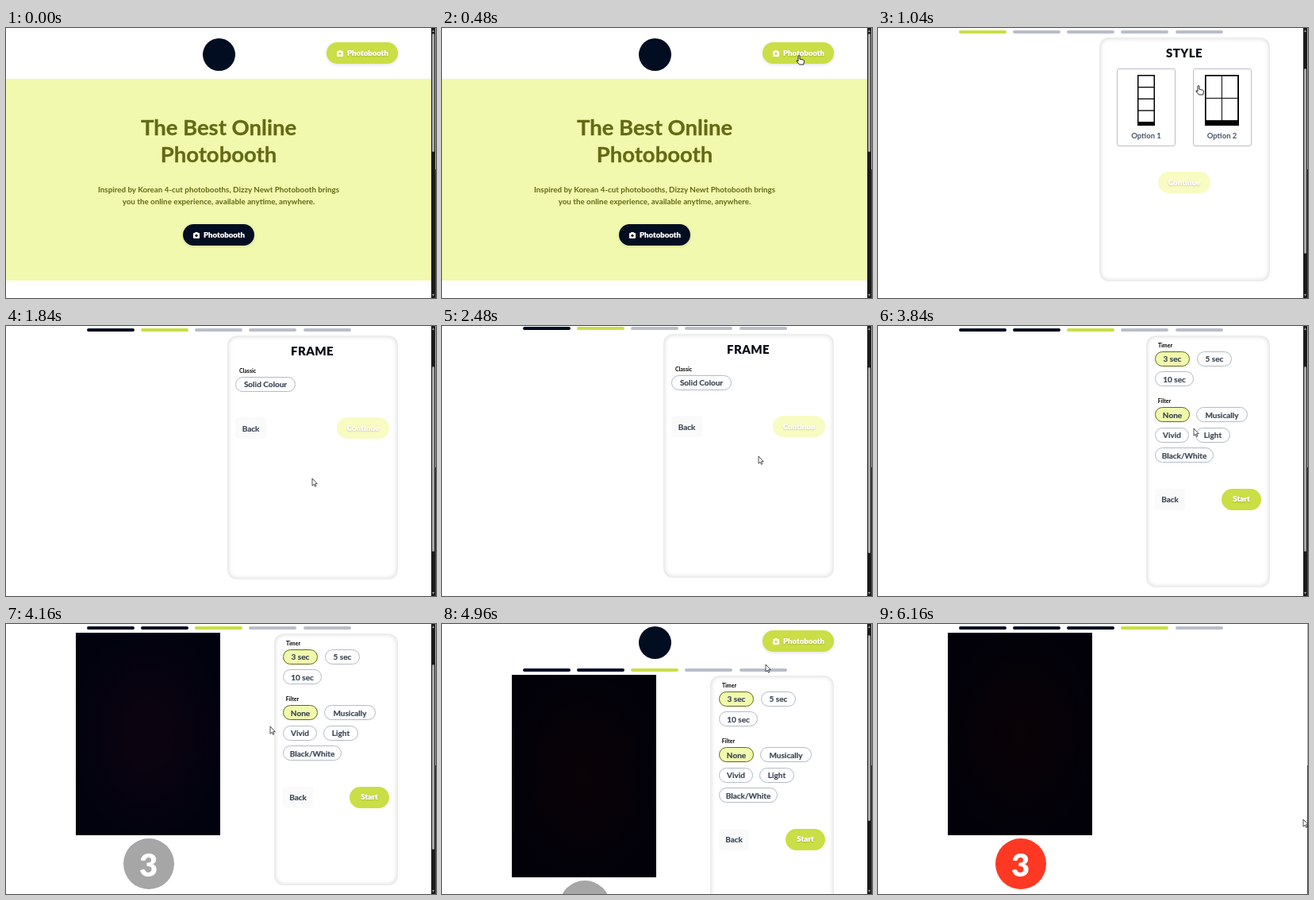
An HTML page that plays this animation: 542 px wide and 340 px high, repeating every 6.24 s.

```html
<!DOCTYPE html>
<html lang="en">
<head>
<meta charset="utf-8">
<title>Online photobooth</title>
<style>
html, body { margin: 0; width: 100%; height: 100%; overflow: hidden; background: #fff; }
#stage { position: relative; width: 542px; height: 340px; overflow: hidden; background: #fff; font-family: Lato, "Open Sans", sans-serif; font-weight: 700; }
#stage div { position: absolute; box-sizing: border-box; }
#stage svg { position: absolute; overflow: visible; }
#stage .text { white-space: nowrap; transform: translate(-50%, -50%); line-height: 1; }
#stage .button { display: flex; align-items: center; justify-content: center; white-space: nowrap; font-size: 10px; line-height: 1; color: #3c4656; -webkit-text-stroke: .2px; }
#stage .pill { border: 1px solid #b4bac6; border-radius: 10px; }
#stage .chosen { background: #f1f9ad; border-color: #626b14; }
#stage .cta { border-radius: 14px; background: #cade45; color: #fff; font-weight: 900; font-size: 9.8px; text-shadow: 0 1px 2px #0003; }
#stage .hover { background: #dfee87; }
#stage .off { background: #f8fbc2; }
#stage .back { border-radius: 4px; background: #fafafa; }
#stage .panel { border-radius: 12px; background: #fff; box-shadow: inset 0 0 5px 2px #e3e3e3; }
</style>
</head>
<body>
<div id="stage"></div>
<script>
const LOOP = 6240, STEP = 80;
const NAVY = '#020d22', LIME = '#cade45', GREY = '#b9bec9', OLIVE = '#626b14';
const stage = document.getElementById('stage');

const scrollKeys = [[0, 0], [640, 0], [960, 63], [1920, 63], [2160, 65], [2480, 65], [2560, 63],
  [4240, 63], [4800, 10], [5840, 10], [5920, 63]];
const cursorKeys = [[0, 548, 150], [400, 450, 34], [640, 450, 34], [1040, 404, 72], [1280, 432, 88],
  [1440, 432, 88], [1680, 386, 192], [1840, 386, 192], [2480, 399, 164], [2800, 330, 72],
  [2960, 330, 72], [3360, 463, 129], [3520, 463, 129], [4160, 333, 129], [4480, 333, 129],
  [4960, 408, 51], [5280, 300, 110], [5680, 458, 268], [5840, 458, 268], [6160, 536, 246]];
const handTimes = [[320, 640], [1040, 1520], [1600, 1760], [2720, 3040], [3280, 3440], [5600, 5920]];

const within = (t, [from, to]) => t >= from && t < to;

// Eased values between timed keys
function at(keys, t) {
  const i = keys.findIndex(k => k[0] > t);
  if (i < 0) return keys[keys.length - 1].slice(1);
  const a = keys[i - 1], b = keys[i];
  const p = (t - a[0]) / (b[0] - a[0]), e = p * p * (3 - 2 * p);
  return a.slice(1).map((v, n) => v + (b[n + 1] - v) * e);
}

const box = (x, y, w, h, css = '', html = '', cls = '') =>
  `<div class="${cls}" style="left:${x}px;top:${y}px;width:${w}px;height:${h}px;${css}">${html}</div>`;
const fill = (x, y, w, h, color, radius = 0) => box(x, y, w, h, `background:${color};border-radius:${radius}px`);
const text = (x, y, size, str, css = '') =>
  `<div class="text" style="left:${x}px;top:${y}px;font-size:${size}px;${css}">${str}</div>`;
const button = (x, y, w, h, label, cls, css = '') => box(x, y, w, h, css, label, 'button ' + cls);
const pill = (x, y, w, label, chosen) => button(x, y, w, 19, label, chosen ? 'pill chosen' : 'pill');
const svg = (x, y, body) => `<svg width="1" height="1" style="left:${x}px;top:${y}px">${body}</svg>`;

const boothButton = (x, y, color) =>
  button(x, y, 90, 27, 'Photobooth', 'cta', `padding-left:14px;font-size:9.6px;background:${color};box-shadow:0 1px 4px #0002`) +
  svg(x + 13, y + 10, `<path d="M0 2q0-1 1-1h1l.7-1h2.6l.7 1h1q1 0 1 1v5q0 1-1 1H1q-1 0-1-1z" fill="#fff"/>
    <circle cx="4" cy="4.3" r="1.6" fill="${color}"/>`);

const header = () => fill(247.5, -50, 41, 41, NAVY, 21) + boothButton(404, -45, LIME);

const progress = step => [0, 1, 2, 3, 4].map(i =>
  fill(101.5 + 68.3 * i, 2.75, 60, 4.5, i < step ? NAVY : i > step ? GREY : LIME, 2.5)).join('');

const landing = () => {
  const heading = `color:${OLIVE};-webkit-text-stroke:.3px`;
  const body = `color:${OLIVE}`;
  return fill(0, 1, 536, 254, '#f1f9af') +
    text(268, 61.5, 27.5, 'The Best Online', heading) +
    text(268, 95.5, 27.5, 'Photobooth', heading) +
    text(268, 140.5, 9.8, 'Inspired by Korean 4-cut photobooths, Dizzy Newt Photobooth brings', body) +
    text(268, 155.5, 9.8, 'you the online experience, available anytime, anywhere.', body) +
    boothButton(223, 184, NAVY);
};

const title = str => text(386, 30.5, 15, str, 'font-weight:900;letter-spacing:.4px;color:#050a14');
const caption = (x, y, str) => text(x, y, 7, str, 'color:#000');

function option(x, label, icon, chosen) {
  return box(x, 51, 74, 98, `border:1px solid ${chosen ? OLIVE : GREY};border-radius:3px;background:${chosen ? '#f1f9ad' : '#fff'}`) +
    icon + text(x + 37, 136, 9.5, label, 'color:#4a5568');
}

function style(t) {
  const chosen = t >= 1360;
  const strip = svg(327, 59, `<path d="M0 0H22V64H0z"/>` + [0, 1, 2, 3].map(i =>
    `<path d="M1.5 ${1.5 + 14.7 * i}h19v13.4h-19z" fill="#fff"/>`).join(''));
  const grid = svg(412, 59, `<path d="M0 0H43V64H0z"/>` + [0, 1, 2, 3].map(i =>
    `<path d="M${1.7 + 20.2 * (i % 2)} ${1.7 + 28.2 * (i >> 1)}h19.2v27.2h-19.2z" fill="#fff"/>`).join(''));
  const state = !chosen ? 'off' : t >= 1600 ? 'hover' : '';
  return box(279, 12, 215, 307, '', '', 'panel') + title('STYLE') +
    option(301, 'Option 1', strip, false) + option(396.5, 'Option 2', grid, chosen) +
    button(353, 181, 66, 27, 'Continue', 'cta ' + state);
}

function preview() {
  let html = box(43, 12, 214, 316.5, 'border:3px solid #b9bec1;background:#fff');
  for (const x of [53, 152]) for (const y of [22.5, 159]) html += fill(x, y, 95, 132.5, '#000');
  return html;
}

function frame(t) {
  const chosen = t >= 2960;
  const state = !chosen ? 'off' : t >= 3280 ? 'hover' : '';
  return (chosen ? preview() : '') +
    box(279, 12, 215, chosen ? 317 : 307, '', '', 'panel') + title('FRAME') +
    caption(304.5, 56, 'Classic') + pill(289, 63.5, 76, 'Solid Colour', chosen) +
    button(289, 115, 39, 27, 'Back', 'back') + button(417, 115, 66, 27, 'Continue', 'cta ' + state);
}

function camera(t, color) {
  const glow = t < 4480 ? '#0d0310, #02020f 75%' : '#090206, #020109 75%';
  return box(88, 11, 182, 255, `background:radial-gradient(${glow})`) +
    fill(147.7, 270, 64, 64, color, 32) +
    text(179.7, 302.5, 40, '3', 'font-weight:900;color:#fff');
}

const settings = t =>
  (t >= 3920 ? camera(t, '#a6a6a6') : '') +
  box(338, 12, 156, 317, '', '', 'panel') +
  caption(362, 23.5, 'Timer') +
  pill(349, 31.5, 44, '3 sec', true) + pill(402, 31.5, 44, '5 sec') + pill(349, 57, 49, '10 sec') +
  caption(361, 93.5, 'Filter') +
  pill(349, 102, 44, 'None', true) + pill(401, 102, 65, 'Musically') +
  pill(349, 127.5, 43, 'Vivid') + pill(400, 127.5, 44, 'Light') + pill(349, 153, 74, 'Black/White') +
  button(349, 204.5, 38, 27, 'Back', 'back') +
  button(433, 204.5, 50, 27, 'Start', t >= 5600 ? 'cta hover' : 'cta');

const scenes = [[560, landing], [1760, style], [3440, frame], [5920, settings], [LOOP, t => camera(t, '#ff3823')]];

function scrollbar(scroll, pageHeight) {
  const k = 326 / pageHeight;
  return fill(536, 0, 5, 340, '#1b1b1b') +
    fill(537, 7 + scroll * k, 3, 340 * k - 1, '#a8a8a8', 1.5) +
    svg(537, 2, '<path d="M0 3L1.5 0 3 3zM0 333h3l-1.5 3z" fill="#999"/>');
}

function cursor(t) {
  const [x, y] = at(cursorKeys, t);
  const hand = handTimes.some(range => within(t, range));
  const shape = hand
    ? '<path d="M-1 1.2q1-1.8 2 0v4l4.5 1q1.2.4 1 2L5.8 12H.5L-3 8q-.4-1.6 1-1l1 .8z" fill="#fff" stroke="#111" stroke-width=".9"/>'
    : '<path d="M0 0v9.2l2.1-1.9 1.4 3 1.4-.6-1.4-3H6.3z" fill="#fff" stroke="#222" stroke-width=".8"/>';
  return svg(x, y, shape);
}

function render(t) {
  const index = scenes.findIndex(s => t < s[0]);
  const [scroll] = at(scrollKeys, t);
  const last = index === scenes.length - 1;
  stage.innerHTML =
    box(0, 63 - scroll, 542, 340, '', (last ? '' : header()) + (index ? progress(index - 1) : '') + scenes[index][1](t)) +
    (last ? '' : scrollbar(scroll, index ? 472 : 739)) +
    fill(541, 0, 1, 178, '#aaa') + fill(541, 178, 1, 162, '#444') +
    cursor(t);
}

let shown = -1;
function tick() {
  const t = Math.floor(performance.now() % LOOP / STEP) * STEP;
  if (t !== shown) render(shown = t);
  requestAnimationFrame(tick);
}
tick();
</script>
</body>
</html>
```
